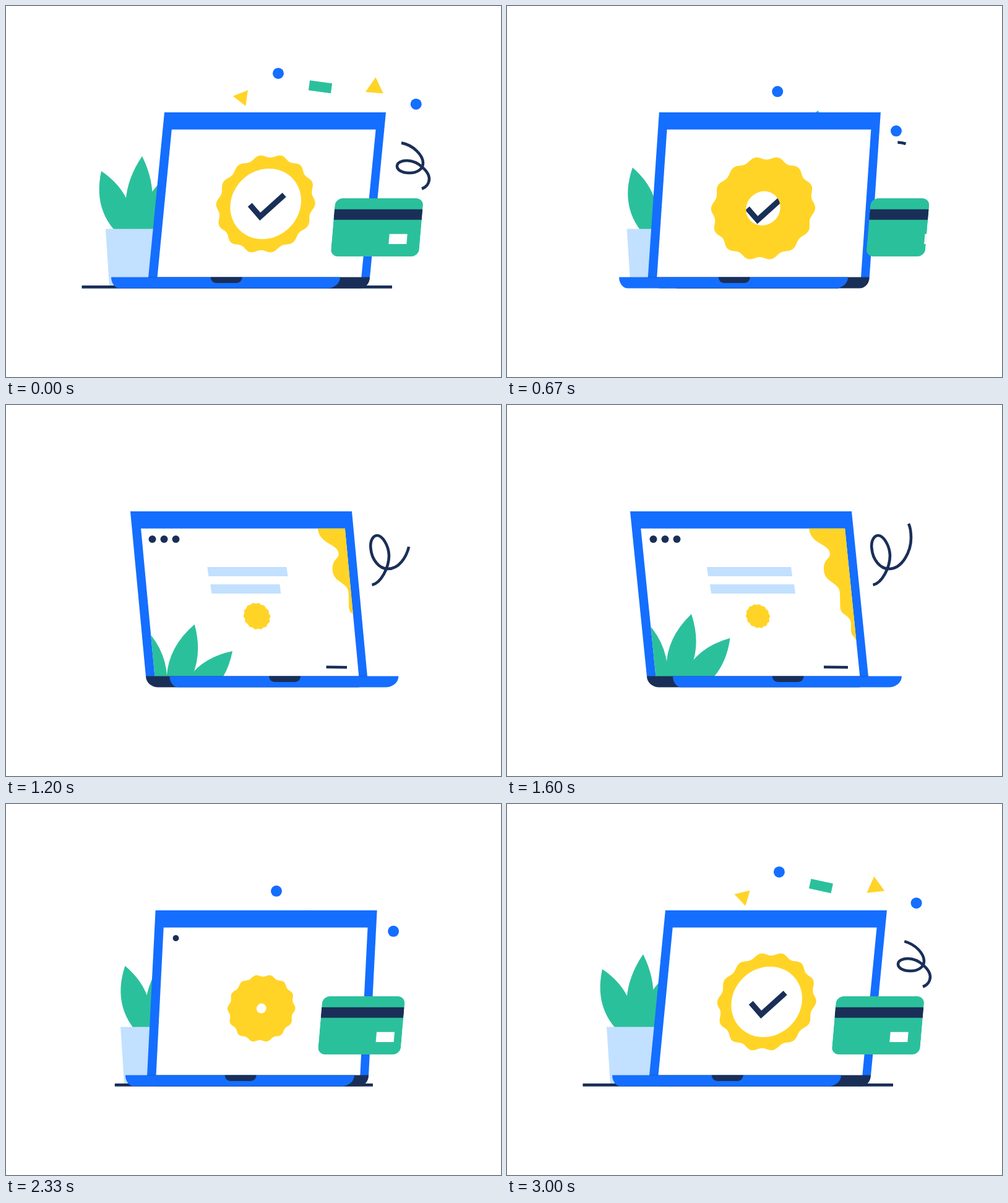
Write an HTML page with a canvas that moves like this. It is 800 px wide and 600 px high and loops after 3070 ms.

```html
<!DOCTYPE html>
<html lang="en">
<head>
<meta charset="utf-8">
<title>Laptop checkout</title>
<style>
html, body { margin: 0; width: 100%; height: 100%; overflow: hidden; background: #fff; }
canvas { display: block; }
</style>
</head>
<body>
<canvas id="stage" width="800" height="600"></canvas>
<script>
const c = document.getElementById('stage').getContext('2d');
const BLUE = '#146eff', YELLOW = '#ffd426', GREEN = '#2bc09c', LIGHT = '#c2e0ff', DARK = '#1a2f58', WHITE = '#fff';
const LOOP = 3070, STEP = 1000 / 15, TURN = 22 * STEP, BACK = 24 * STEP;
let t, age, leaving, turn, lean, windUp, dip;

const clamp = x => Math.max(0, Math.min(1, x));
const mix = (a, b, k) => a + (b - a) * k;
const part = (a, b) => clamp((t - a) / (b - a));
const smooth = (a, b) => part(a, b) ** 2 * (3 - 2 * part(a, b));
const out = (a, b) => 1 - (1 - part(a, b)) ** 2;
const bump = (mid, width) => Math.exp(-(((t - mid) / width) ** 2));
// 1 while the checkout scene is up: it leaves during a..b and comes back during d..e.
const shown = (a, b, d, e) => 1 - smooth(a, b) + smooth(d, e);

// cubic-bezier(.83, 0, .02, 1)
function swing(x) {
  let lo = 0, hi = 1, s;
  for (let i = 0; i < 20; i++) {
    s = (lo + hi) / 2;
    const at = 3 * (1 - s) * s * ((1 - s) * .83 + s * .02) + s ** 3;
    if (at < x) lo = s; else hi = s;
  }
  return s * s * (3 - 2 * s);
}

function setTime(ms) {
  t = ms;
  leaving = t < BACK;
  age = leaving ? t + LOOP : t; // keeps running across the loop seam
  turn = leaving ? swing(clamp((t - 2 * STEP) / TURN)) : 1 - swing(clamp((t - BACK) / TURN));
  lean = mix(26, -27, turn);
  windUp = bump(530, 170);
  dip = bump(2200, 220);
}

const reset = () => c.setTransform(1, 0, 0, 1, 0, 0);
const shear = (k, x, y) => c.setTransform(1, 0, -k, 1, x, y);

function turned(x, y, deg, draw) {
  c.save();
  c.translate(x, y);
  c.rotate(deg * Math.PI / 180);
  draw();
  c.restore();
}

function rect(color, x, y, w, h) {
  c.fillStyle = color;
  c.fillRect(x, y, w, h);
}

function poly(color, ...p) {
  c.beginPath();
  for (let i = 0; i < p.length; i += 2) c.lineTo(p[i], p[i + 1]);
  c.fillStyle = color;
  c.fill();
}

function disc(color, x, y, r) {
  c.beginPath();
  c.arc(x, y, r, 0, 2 * Math.PI);
  c.fillStyle = color;
  c.fill();
}

function curve(d) {
  const p = document.createElementNS('http://www.w3.org/2000/svg', 'path');
  p.setAttribute('d', d);
  return { path: new Path2D(d), length: p.getTotalLength() };
}

// Strokes the part of a curve between two fractions.
function trim({ path, length }, from, to, width) {
  if (to - from < .003) return;
  c.strokeStyle = DARK;
  c.lineWidth = width;
  c.setLineDash([length * (to - from) + .1, 9999]);
  c.lineDashOffset = -length * from;
  c.stroke(path);
  c.setLineDash([]);
}

const ribbonA = curve('M631 220.5C655 221 674 240 674 254C674 265 663 270 652 270C640 270 632 265 632 259C632 253 640 250 648 250C668 250 684 270 684 279C684 287 679 293 672 295.5');
const ribbonB = curve('M591.5 291C606 288 619 263 619 243C618 226 608 211 600 211C593 211 588 220 589.5 232C591 250 603 265 617 265C640 265 653 235 653 215C653 205 652 198 649 192');
const tick = curve('M-25.5 1.5L-9 20.5L30 -14.7');
const wave = new Path2D('M488 199C490 226 522 224 522 241C522 249 512 249 512 265C512 289 538 285 538 305L538.5 325C538.5 331 540 335 546 339C560 349 555 355 556 365C557 377 562 370 565 385L700 385L700 199Z');

// Two mirrored arcs from a base to a tip; both are relative to the pivot.
function leaf(px, py, deg, bx, by, tx, ty) {
  turned(px, py, deg, () => {
    const len = Math.hypot(tx - bx, ty - by), bulge = 43 / len;
    const nx = (by - ty) * bulge, ny = (tx - bx) * bulge;
    const mx = (bx + tx) / 2, my = (by + ty) / 2;
    c.beginPath();
    c.moveTo(bx, by);
    c.quadraticCurveTo(mx - nx, my - ny, tx, ty);
    c.quadraticCurveTo(mx + nx, my + ny, bx, by);
    c.fillStyle = GREEN;
    c.fill();
  });
}

// Pieces burst from a point behind the laptop and drift on more and more slowly.
function confetti() {
  const drift = 1.012 - .096 * Math.exp((2330 - age) / 355);
  const spread = Math.max(.72, drift - .3 * (1 - shown(560, 860, 2130, 2330)));
  const frames = (age - LOOP) / STEP;
  const piece = (x, y, gain, deg, spin, draw) => {
    const s = 1 + gain * (spread - 1);
    turned(mix(404, x, s), mix(492, y, s), deg + spin * frames, draw);
  };
  const triangle = r => () => poly(YELLOW, r, 0, -r / 2, r * .866, -r / 2, -r * .866);
  const dot = () => disc(BLUE, 0, 0, 9);
  piece(440, 109, 1, 0, 0, dot);
  piece(662.7, 158.7, 1.7, 0, 0, dot);
  piece(381.7, 148, 2.5, 188, -7.8, triangle(15));
  piece(596, 132, 2, -85, 10.7, triangle(16.7));
  piece(508, 130.8, 2, 8, -4.2, () => rect(GREEN, -18.2, -8, 36.4, 16));
}

function pottedPlant() {
  const hidden = 1 - shown(500, 880, 2130, 2450);
  const sway = 20 * hidden - 2.5 * windUp;
  c.translate(161 + 80 * hidden, 0);
  leaf(50, 400, sway, -10, -15, -57, -133);
  leaf(50, 400, sway, -1, -10, 9, -157);
  leaf(50, 400, sway, 8, -15, 62, -133);
  poly(LIGHT, 0, 360.5, 80, 360.5, 74, 453, 6, 453);
  reset();
}

function ground() {
  const hidden = 1 - shown(430, 900, 2070, 2430);
  const left = 122.5 + 300 * hidden, right = 624 - 175 * hidden;
  if (hidden < .97) rect(DARK, left, 452, right - left, 4.8);
}

function ribbons() {
  trim(ribbonA, Math.min(1, Math.exp((2400 - age) / 207)), leaving ? 1 - smooth(380, 720) : 1, 4.6);
  trim(ribbonB, smooth(1820, 2320), out(830, 1430), 4.6);
}

function bar(x, y, from, to) {
  if (to <= from) return;
  shear(lean / 190, x + 1.2 * (lean + 27), y);
  rect(LIGHT, 136 * from, 0, 136 * (to - from), 15);
  reset();
}

function page() {
  bar(323, 262, smooth(2000, 2300), out(820, 1320));
  bar(328, 290, smooth(1870, 2170), out(910, 1410));

  for (let i = 0; i < 3; i++) {
    const grow = out(735 + 67 * i, 885 + 67 * i), fade = part(2270 - 100 * i, 2420 - 100 * i) ** 2;
    disc(DARK, 274.5 - 19 * i, 217, 6 * grow * (1 - fade));
  }

  c.translate(110 * (1 - out(870, 1400) + smooth(2030, 2330)), 0);
  c.fillStyle = YELLOW;
  c.fill(wave);
  reset();

  const away = 1 - out(870, 1350);
  const bend = 30 * (away + smooth(1920, 2330));
  const y = 470 + 150 * (away + smooth(2070, 2330));
  leaf(260, y, bend * .4, -5, 0, -48, -132);
  leaf(260, y, bend, 5, 0, 38, -132);
  leaf(260, y, bend * 1.2, 15, 5, 100.5, -93);

  const left = 551 - 39 * (out(870, 1400) - smooth(2045, 2245));
  poly(DARK, left, 421.5, 551, 422, 551, 426.5, left, 426);
}

function badge() {
  const home = shown(480, 960, 2070, 2590);
  const x = mix(405.5, 419.7, home) - 1.8 * windUp, y = mix(341.5, 320, home);
  const radius = mix(80, 19.5, turn) + 25 * windUp - 16 * dip;
  const hole = shown(500, 820, 2230, 2670) * (57 + 4 * windUp);
  shear(lean / 267, x, y);
  c.beginPath();
  for (let i = 0; i < 280; i++) {
    const a = i * Math.PI / 140, r = radius * (.968 + .032 * Math.cos(14 * a));
    c.lineTo(r * Math.cos(a), r * Math.sin(a));
  }
  c.fillStyle = YELLOW;
  c.fill();
  c.save();
  disc(WHITE, 0, 0, hole);
  c.clip();
  c.setTransform(1, 0, 0, 1, x, y - 3 * windUp);
  trim(tick, 0, leaving ? 1 : smooth(2400, 2730), 9);
  c.restore();
  reset();
}

// A flat bar with rounded lower corners.
function tray(color, x, w, h, left, right) {
  const y = 438.5;
  c.beginPath();
  c.moveTo(x, y);
  c.lineTo(x + w, y);
  c.ellipse(x + w - right, y, right, h, 0, 0, Math.PI / 2);
  c.ellipse(x + left, y, left, h, 0, Math.PI / 2, Math.PI);
  c.fillStyle = color;
  c.fill();
}

function laptop() {
  const x = 226 + 4 * shown(480, 960, 2070, 2590) - 1.7 * windUp;
  const front = mix(170, 268, turn) - 6.5 * windUp;

  c.save();
  shear(lean / 267, x, 439);
  rect(BLUE, 0, -267, 358, 267);
  rect(WHITE, 14.5, -239.3, 329.8, 239.3);
  c.beginPath();
  c.rect(14.5, -239.3, 329.8, 239.3);
  c.clip();
  reset();
  page();
  badge();
  c.restore();

  tray(DARK, x, 358, 18, 20, 16);
  tray(BLUE, front, 370, 18, 14, 21);
  tray(DARK, front + 160.7, 51, 9.5, 9, 9);
}

function card() {
  const size = shown(570, 820, 2130, 2370), w = 142.5 * size;
  if (w < 1) return;
  const shift = leaving ? 155 * (1 - size) : -43 * (1 - part(2130, LOOP)) ** 3;
  c.save();
  shear(.086, 524.3 + 8 * windUp + shift, 405);
  c.beginPath();
  c.roundRect(0, -94, w, 94, Math.min(12, w / 2));
  c.clip();
  rect(GREEN, 0, -94, w, 94);
  rect(DARK, 0, -76.2, w, 17);
  rect(WHITE, 92.3, -36.3, 29, 16.3);
  c.restore();
}

function draw() {
  const frame = Math.min(45, Math.floor((performance.now() % LOOP + 5) / STEP));
  setTime(frame * STEP);
  reset();
  rect(WHITE, 0, 0, 800, 600);
  confetti();
  pottedPlant();
  ground();
  ribbons();
  laptop();
  card();
  requestAnimationFrame(draw);
}
draw();
</script>
</body>
</html>
```
